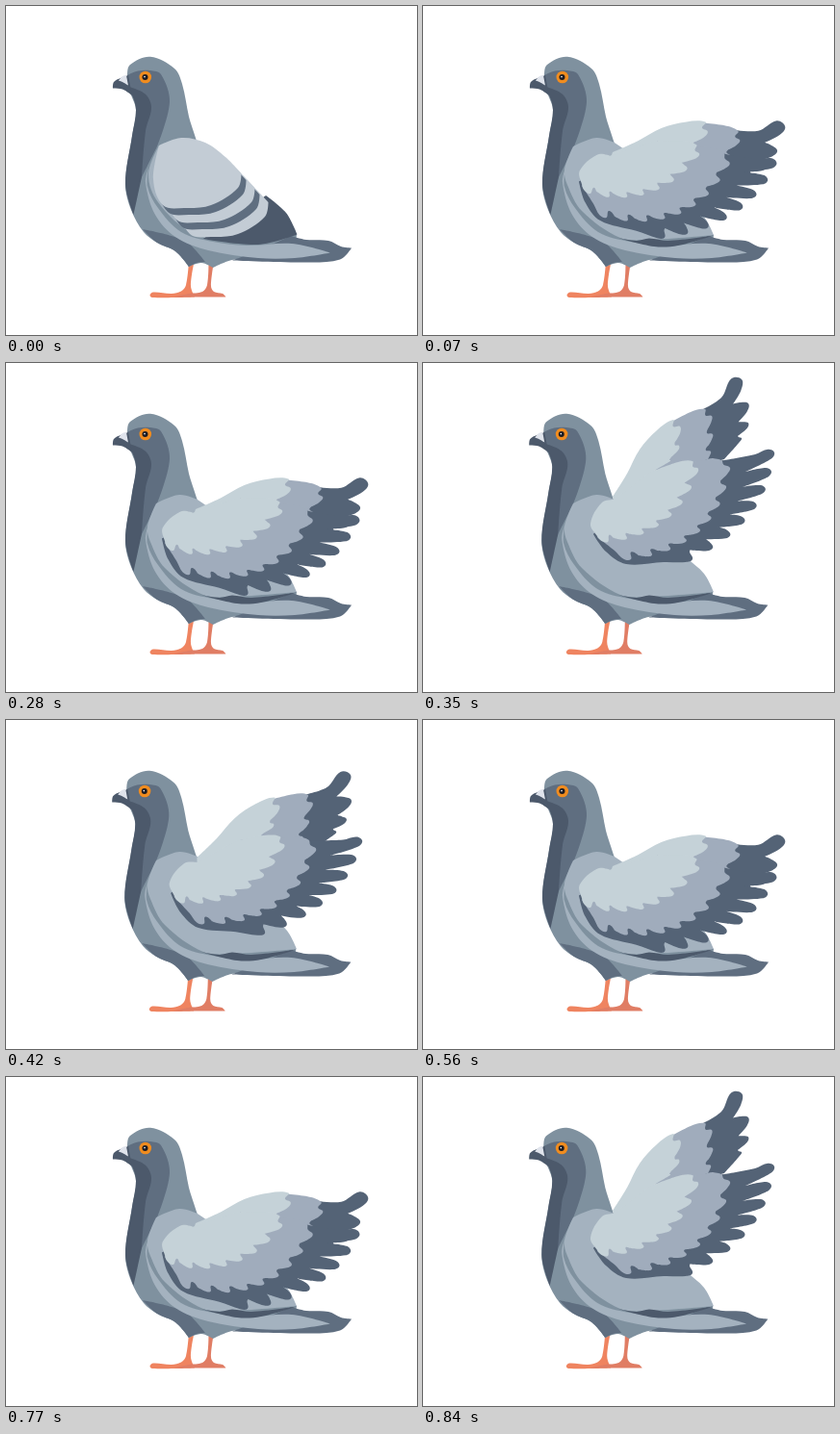
An HTML page for the animation above (910 ms loop, 427x342 px).

```html
<!DOCTYPE html>
<html lang="en">
<head>
<meta charset="utf-8">
<title>Pigeon</title>
<style>
html, body { margin: 0; width: 100%; height: 100%; overflow: hidden; background: #fff; }
svg { display: block; width: 100vw; height: 100vh; }
</style>
</head>
<body>
<svg viewBox="0 0 427 342"></svg>
<script>
const GREY = '#7f919f', SLATE = '#5f6e80', DARK = '#4c596b', SILVER = '#a4b2bf';
const LIGHT = '#c3ccd5', PALE = '#c5d2d8', MID = '#a0acbc', TIP = '#546376';
const SHOULDER = [175, 160];

// Smooth closed curve through "x,y" points; a trailing "!" makes a corner.
function curve(text) {
  const points = text.trim().split(/\s+/).map(item => {
    const [x, y] = item.split(',').map(parseFloat);
    return { x, y, corner: item.endsWith('!') };
  });
  const n = points.length;
  const handle = (i, length, side) => {
    const p = points[i], a = points[(i + n - 1) % n], b = points[(i + 1) % n];
    const dx = b.x - a.x, dy = b.y - a.y;
    const k = p.corner ? 0 : side * length / 3 / (Math.hypot(dx, dy) || 1);
    return `${p.x + dx * k},${p.y + dy * k}`;
  };
  let d = `M${points[0].x},${points[0].y}`;
  points.forEach((p, i) => {
    const j = (i + 1) % n, q = points[j];
    const length = Math.hypot(q.x - p.x, q.y - p.y);
    d += `C${handle(i, length, 1)} ${handle(j, length, -1)} ${q.x},${q.y}`;
  });
  return d + 'Z';
}

const shape = (fill, points) => `<path fill="${fill}" d="${curve(points)}"/>`;
const dot = (fill, x, y, r) => `<circle fill="${fill}" cx="${x}" cy="${y}" r="${r}"/>`;
const group = (transform, content) => `<g transform="${transform}">${content}</g>`;

// Feather ends along the parabola through three points, each pointing away
// from the shoulder, with notches that get shallower towards the last one.
function feathers(first, middle, last, count, depth) {
  const at = t => first.map((v, i) =>
    v * (1 - t) * (1 - 2 * t) + middle[i] * 4 * t * (1 - t) + last[i] * t * (2 * t - 1));
  const half = 0.5 / (count - 1);
  const out = [];
  for (let i = 0; i < count; i++) {
    const t = i / (count - 1), tip = at(t), before = at(t - half), after = at(t + half);
    const rx = tip[0] - SHOULDER[0], ry = tip[1] - SHOULDER[1], r = Math.hypot(rx, ry);
    const ux = rx / r, uy = ry / r;
    const w = 0.28 * ((after[1] - before[1]) * ux - (after[0] - before[0]) * uy);
    const place = (p, back, side, end = '') =>
      out.push(`${p[0] - ux * back - uy * side},${p[1] - uy * back + ux * side}${end}`);
    place(tip, w, -w);
    place(tip, 0, 0);
    place(tip, w, w);
    if (i < count - 1) place(after, depth * (1 - 0.6 * (t + half)), 0, '!');
  }
  return out.join(' ');
}

const body = [
  // legs
  shape('#ef8460', '190,266! 195.5,266! 192,291 196,302.5! 152,303 149.5,300.5 153,297.5 172,299 182,296.5 187,290'),
  shape('#e07d64', '210.5,266! 216,266! 213,291 216,297 225,299 228.5,302.5! 174,302.5! 190,299 204,297 209,290'),
  // trunk, belly and tail
  shape(GREY, `126,72 129,61 150,52.7 175,65 183,81 190,115 193,125 199,143! 302,238! 300,255! 235,264 215,272!
    203,267 190,271! 176,255 157,246 143,235 130,212 124,185 131,135 135,108 128,87`),
  shape(SLATE, '142,232! 172,239 190,247 207,266! 198,267 190,271! 176,255 157,246'),
  shape(SLATE, '296,239! 312,243 335,244 348,250 359,251.5! 347,263.5 310,266.5 235,264.5! 262,254'),
  shape(SILVER, `148,168! 147,188 158,210 182,235 215,245 250,249 297,247 337,256.5!
    300,262 262,262 210,254 176,240 155,217 145,184`),
  // neck and face
  shape(SLATE, '126,72! 137,67.5 150,67 161,71 170,100 157,146! 141,178! 130,170! 137,100! 126,82!'),
  shape(DARK, '124,83! 144,91 151,105 145,130 141,178! 132.5,217! 124,185 131,135 135,108 131,93'),
  // beak and eye
  shape(DARK, '111,85.5! 112,79 119,75 127,72! 131,93! 121,86.5'),
  shape('#e0e4ec', '117,77.5! 121,73 125,72! 127,82.5! 121,79'),
  dot('#f08c1f', 144.8, 74, 6.3), dot('#1b1c24', 144.5, 74, 3), dot('#fff', 144, 73.6, 0.8)
].join('');

// Three overlapping rows of coverts, each a shifted copy with a dark rim.
function foldedWing() {
  const covert = (fill, x, y) => group(`translate(${x} ${y})`, shape(fill,
    '159,145! 182,137 207,142 228,157 244.5,174! 241,189 213,207 185,210 163,207 153,180'));
  let rows = covert(LIGHT, 28, 30);
  for (const k of [1, 0]) rows += covert(SLATE, 14 * k + 5, 15 * k + 7) + covert(LIGHT, 14 * k, 15 * k);
  return shape(SILVER, '159,145! 240,200! 240,244! 195,237 158,204 148,175') +
    shape(DARK, '270,197! 291,215 302.5,237.5! 262,248 205,242!') + rows;
}

const back =
  shape(SILVER, '156,146! 180,137 199,142! 232,166 273,202 292,219 302,238! 235,243 205,241 165,213 150,186 147,170') +
  shape(DARK, '203,241! 222,244 235,241.5 255,244 302,238.5! 265,249 240,250');

const outer =
  shape(TIP, `285,51! 310,36 ${feathers([331, 17], [339, 53], [331, 78], 4, 20)} 313,100! 250,120!`) +
  shape(MID, `250,66! 278,51 293,48 ${feathers([300, 55], [301, 74], [299, 92], 3, 8)} 296,100! 240,120!`) +
  shape(PALE, `197,139! 212,115 225,90 243,70 260,59 ${feathers([267, 66], [266, 86], [257, 101], 3, 10)} 240,112! 200,150!`);

const inner =
  shape(TIP, `240,115! 313,101! 345,95 ${feathers([365, 93], [341, 156], [280, 204], 8, 32)} 250,207 211,209 190,196 177,178!`) +
  shape(MID, `240,112! 300,99! 310,101 ${feathers([319, 109], [288, 174], [216, 204], 9, 9)} 199,195 181,181!`) +
  shape(PALE, `199,142! 235,114! 265,103 280,102 ${feathers([286, 110], [252, 163], [192, 186], 8, 13)} 181,180 174,167 186,145`);

// The wing is two fans turning about the shoulder: [shift x, shift y, degrees].
const fan = ([x, y, angle], content) => group(`translate(${x} ${y}) rotate(${angle} ${SHOULDER})`, content);
const spread = (outerTurn, innerTurn) => back + fan(outerTurn, outer) + fan(innerTurn, inner);

// The bird leans back slightly while the wing is raised.
const lean = group('translate(-0.7 0)', body);
const poses = {
  rest: body + foldedWing(),
  low: body + spread([-8, -3, 34], [-9, 5, 19]),
  high: lean + spread([0, 0, 0], [0, 0, 0]),
  middle: lean + spread([-3, -2, 14], [-3, 2, 9])
};
const beat = ['low', 'high', 'middle'];
const sequence = ['rest', ...beat, ...beat, 'middle', ...beat, 'low', 'high'];

const svg = document.querySelector('svg');
const start = performance.now();
let shown;

function loop() {
  const step = Math.floor((performance.now() - start) / 70) % sequence.length;
  const pose = sequence[step];
  if (pose !== shown) svg.innerHTML = poses[shown = pose];
  requestAnimationFrame(loop);
}
loop();
</script>
</body>
</html>
```
